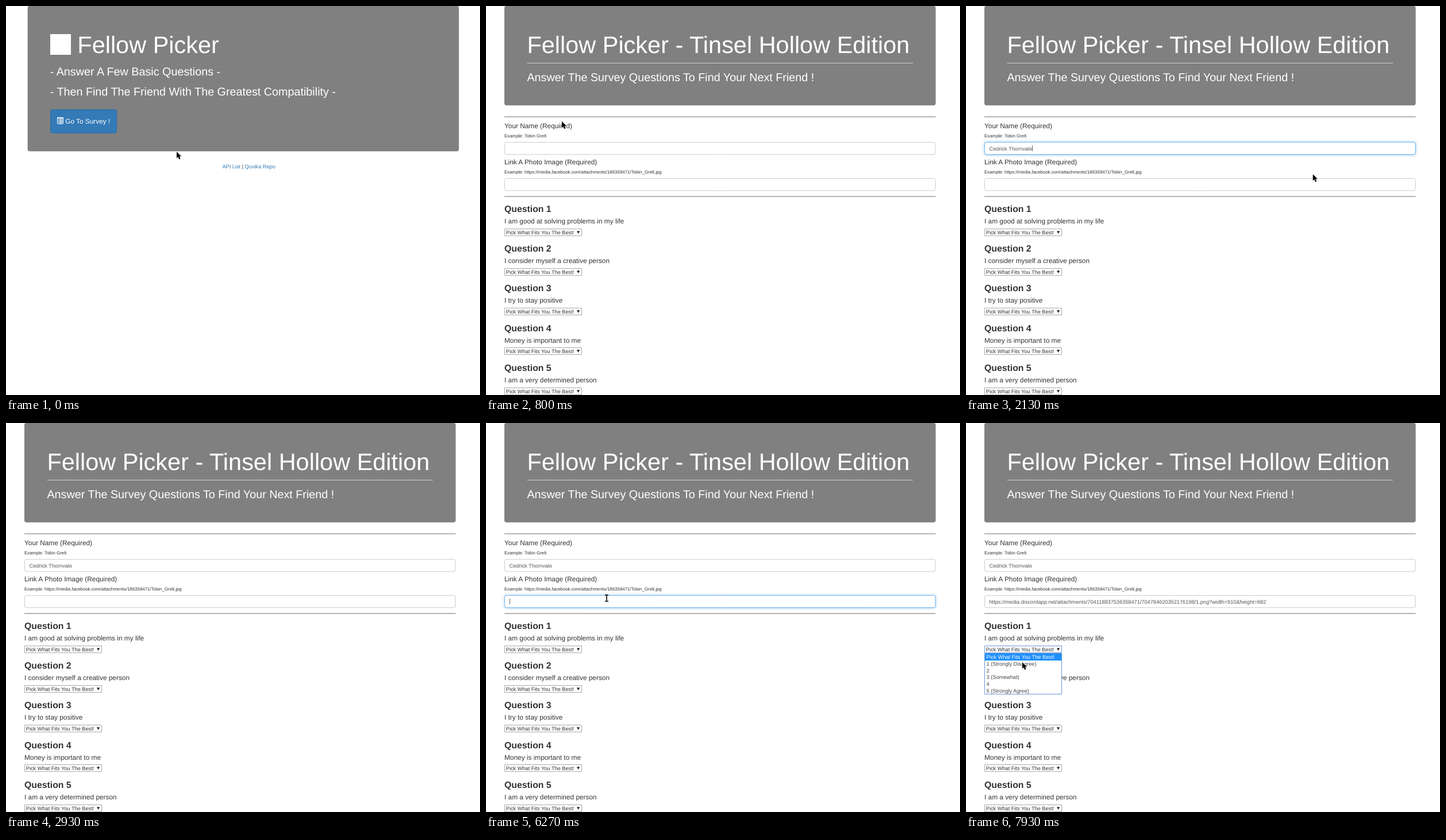
An HTML page with a canvas for the animation above (8 s loop, 825 by 678 pixels).

```html
<!DOCTYPE html>
<html lang="en">
<head>
<meta charset="utf-8">
<title>Survey</title>
<style>
  html, body { margin: 0; width: 100%; height: 100%; overflow: hidden; background: #fff; }
  canvas { display: block; }
</style>
</head>
<body>
<canvas id="stage" width="825" height="678"></canvas>
<script>
const ctx = document.getElementById('stage').getContext('2d');
const LOOP = 8000;
const ZOOM = 0.6585; // the page is shown at this scale
const SIZE = { title: 63 * ZOOM, sub: 30 * ZOOM, head: 24 * ZOOM, body: 18 * ZOOM, field: 14 * ZOOM, small: 12 * ZOOM };
const WIDE = 1140 * ZOOM;
const INK = '#333';
const PROMPT = 'Pick What Fits You The Best!';
const NAME = 'Cedrick Thornvale';
const PHOTO = 'https://media.discordapp.net/attachments/704118837536358471/704784620352176198/1.png?width=910&height=682';
const QUESTIONS = [
  'I am good at solving problems in my life',
  'I consider myself a creative person',
  'I try to stay positive',
  'Money is important to me',
  'I am a very determined person'
];
const CHOICES = [PROMPT, '1 (Strongly Disagree)', '2', '3 (Somewhat)', '4', '5 (Strongly Agree)'];

const PAGE_AT = 800, NAME_FOCUS = 1470, NAME_PASTE = 1800, NAME_BLUR = 2930;
const PHOTO_FOCUS = 6200, PHOTO_PASTE = 6470, MENU_AT = 7800, BLINK = 530;

// Pointer path: time, x, y
const PATH = [
  [20, 297, 254], [330, 132, 201], [PAGE_AT, 132, 201], [1270, 112, 251],
  [NAME_PASTE, 112, 251], [2330, 832, 313], [5530, 392, 373], [6180, 210, 305],
  [6850, 210, 305], [7270, 81, 399], [7500, 87, 397], [MENU_AT - 30, 87, 397], [7930, 98, 417]
];
const HIDDEN = [[NAME_PASTE, 1865], [2330, 5529], [PHOTO_PASTE, 6865]];

const clamp = v => Math.max(0, Math.min(1, v));
const within = (t, a, b) => t >= a && t < b;
const blinkOn = (t, from) => Math.floor((t - from) / BLINK) % 2 === 0;

function text(str, x, y, size, color = INK, weight = '') {
  ctx.font = `${weight} ${size}px "Liberation Sans", Arial, sans-serif`;
  ctx.fillStyle = color;
  ctx.fillText(str, x, y);
  return ctx.measureText(str).width;
}

function rect(x, y, w, h, color) {
  ctx.fillStyle = color;
  ctx.fillRect(x, y, w, h);
}

function box(x, y, w, h, r, fill, border) {
  const o = border ? 0.5 : 0;
  ctx.beginPath();
  ctx.roundRect(x + o, y + o, w - 2 * o, h - 2 * o, r);
  ctx.fillStyle = fill;
  ctx.fill();
  if (border) {
    ctx.lineWidth = 1;
    ctx.strokeStyle = border;
    ctx.stroke();
  }
}

function poly(points, fill, stroke, width = 1) {
  ctx.beginPath();
  points.forEach(([x, y]) => ctx.lineTo(x, y));
  ctx.closePath();
  if (stroke) {
    ctx.lineWidth = width;
    ctx.strokeStyle = stroke;
    ctx.stroke();
  }
  ctx.fillStyle = fill;
  ctx.fill();
}

function pointer(t) {
  let i = 0;
  while (i < PATH.length - 1 && PATH[i + 1][0] <= t) i++;
  const [t0, x0, y0] = PATH[i];
  const [t1, x1, y1] = PATH[Math.min(i + 1, PATH.length - 1)];
  const k = t1 > t0 ? clamp((t - t0) / (t1 - t0)) : 0;
  const e = k * k * (3 - 2 * k);
  return { x: x0 + (x1 - x0) * e, y: y0 + (y1 - y0) * e };
}

const over = (p, x, y, w, h) => within(p.x, x, x + w) && within(p.y, y, y + h);

function drawArrow({ x, y }, fill, edge) {
  ctx.save();
  ctx.translate(x, y);
  poly([[0, 0], [0, 11.2], [2.5, 9], [4.4, 13.2], [6.6, 12.3], [4.7, 8.2], [8.2, 8.2]], fill, edge, 1.2);
  ctx.restore();
}

function drawBeam({ x, y }) {
  const cx = Math.round(x), cy = Math.round(y);
  rect(cx - 0.8, cy - 5, 1.6, 11, '#000');
  rect(cx - 3, cy - 6, 6, 1.4, '#000');
  rect(cx - 3, cy + 5, 6, 1.4, '#000');
}

function drawPointer(t, p) {
  if (HIDDEN.some(([a, b]) => within(t, a, b))) return;
  const second = t >= PAGE_AT;
  if (!second && over(p, 77, 180, 116, 42)) drawArrow(p, '#b8a590', '#1c1c1c');
  else if (second && (over(p, 32, 237, WIDE, 22) || over(p, 32, 300, WIDE, 22))) drawBeam(p);
  else drawArrow(p, '#000', 'rgba(255,255,255,.8)');
}

function listIcon(x, y) {
  box(x, y, 11, 12, 1, 'rgba(0,0,0,0)', '#fff');
  rect(x, y, 11, 2, '#fff');
  for (let i = 0; i < 4; i++) {
    rect(x + 2, y + 3 + i * 2, 1.3, 1.2, '#fff');
    rect(x + 4, y + 3 + i * 2, 5.3, 1.2, '#fff');
  }
}

function welcomePage(t, p) {
  box(37.6, -0.3, WIDE, 253.5, 4, '#808080');
  rect(77, 49, 36, 36, '#fff');
  text('Fellow Picker', 124.3, 82, SIZE.title, '#fff');
  text('- Answer A Few Basic Questions -', 76.7, 121, SIZE.sub, '#fff');
  text('- Then Find The Friend With The Greatest Compatibility -', 76.7, 156, SIZE.sub, '#fff');

  const hover = over(p, 77, 180, 116, 42);
  const pressed = within(t, 530, 670);
  const fill = pressed ? '#204d74' : hover ? '#286090' : '#337ab7';
  const border = t >= 530 ? '#4484c4' : hover ? '#204d74' : '#2e6da4';
  box(77, 180, 116, 42, 3, fill, border);
  listIcon(89, 194);
  text('Go To Survey !', 103.2, 205.3, SIZE.body, '#fff');

  let x = 376.4;
  [['API List', '#337ab7'], [' | ', INK], ['Quvika Repo', '#337ab7']].forEach(([s, c]) => {
    x += text(s, x, 283.2, SIZE.field, c);
  });
}

function field(y, value, focus, caret) {
  if (focus > 0) {
    ctx.save();
    ctx.shadowColor = `rgba(102,175,233,${0.6 * focus})`;
    ctx.shadowBlur = 5;
    box(32, y, WIDE, 22.3, 3, '#fff', '#66afe9');
    ctx.restore();
  }
  box(32, y, WIDE, 22.3, 3, '#fff', focus > 0 ? '#7cb8ea' : '#ccc');
  const w = text(value, 40.5, y + 14.5, SIZE.field, '#555');
  if (caret) rect(Math.round(40.5 + w), y + 6, 1, 10, '#666');
}

function select(y, border) {
  box(32, y, 135, 13, 0, '#fff', border);
  ctx.save();
  ctx.beginPath();
  ctx.rect(33, y, 121.3, 13);
  ctx.clip();
  text(PROMPT, 34.8, y + 10, SIZE.field);
  ctx.restore();
  poly([[158, y + 4.3], [163.2, y + 4.3], [160.6, y + 9]], '#222');
}

function menu() {
  box(32, 401, 135, 72, 0, '#fff', '#6a97d8');
  rect(33, 402, 133, 12, '#1e90ff');
  CHOICES.forEach((s, i) => text(s, 35.5, 411.2 + i * 11.75, SIZE.field, i ? '#444' : '#fff'));
}

function surveyPage(t, p) {
  box(32, -0.3, WIDE, 173.5, 4, '#808080');
  text('Fellow Picker - Tinsel Hollow Edition', 71.4, 82, SIZE.title, '#fff');
  rect(71.5, 99, 1020 * ZOOM, 1, '#d0d0d0');
  text('Answer The Survey Questions To Find Your Next Friend !', 71.4, 131, SIZE.sub, '#fff');
  rect(32, 192.6, WIDE, 1, '#6c6c6c');
  rect(32, 331.5, WIDE, 1, '#6c6c6c');

  text('Your Name (Required)', 32, 213, SIZE.body);
  text('Example: Tobin Grelt', 32, 228.6, SIZE.small);
  text('Link A Photo Image (Required)', 32, 276, SIZE.body);
  text('Example: https://media.facebook.com/attachments/186358471/Tobin_Grelt.jpg', 32, 291.6, SIZE.small);

  const named = t >= NAME_PASTE, linked = t >= PHOTO_PASTE;
  const nameOn = within(t, NAME_FOCUS, NAME_BLUR);
  const photoOn = within(t, PHOTO_FOCUS, MENU_AT);
  const glow = from => 0.3 + 0.7 * clamp((t - from) / 90);
  field(237, named ? NAME : '', nameOn ? glow(NAME_FOCUS) : 0,
    nameOn && blinkOn(t, named ? NAME_PASTE : NAME_FOCUS));
  field(300, linked ? PHOTO : '', photoOn ? glow(PHOTO_FOCUS) : 0,
    photoOn && blinkOn(t, linked ? PHOTO_PASTE : PHOTO_FOCUS));

  const open = t >= MENU_AT;
  QUESTIONS.forEach((q, i) => {
    const y = i * 105 * ZOOM;
    const top = Math.round(388 + y);
    text('Question ' + (i + 1), 32, 359.1 + y, SIZE.head, INK, 'bold');
    text(q, 32, 379.1 + y, SIZE.body);
    const hover = i === 0 && over(p, 32, 388, 135, 13);
    select(top, i === 0 && open ? '#6a97d8' : hover ? '#707070' : '#a9a9a9');
  });
  if (open) menu();
}

function draw(t) {
  const p = pointer(t);
  rect(0, 0, 825, 678, '#fff');
  (t < PAGE_AT ? welcomePage : surveyPage)(t, p);
  drawPointer(t, p);
}

ctx.fontKerning = 'normal';
ctx.textRendering = 'geometricPrecision';
const start = performance.now();
function tick(now) {
  draw(Math.max(0, now - start) % LOOP);
  requestAnimationFrame(tick);
}
draw(0);
requestAnimationFrame(tick);
</script>
</body>
</html>
```
